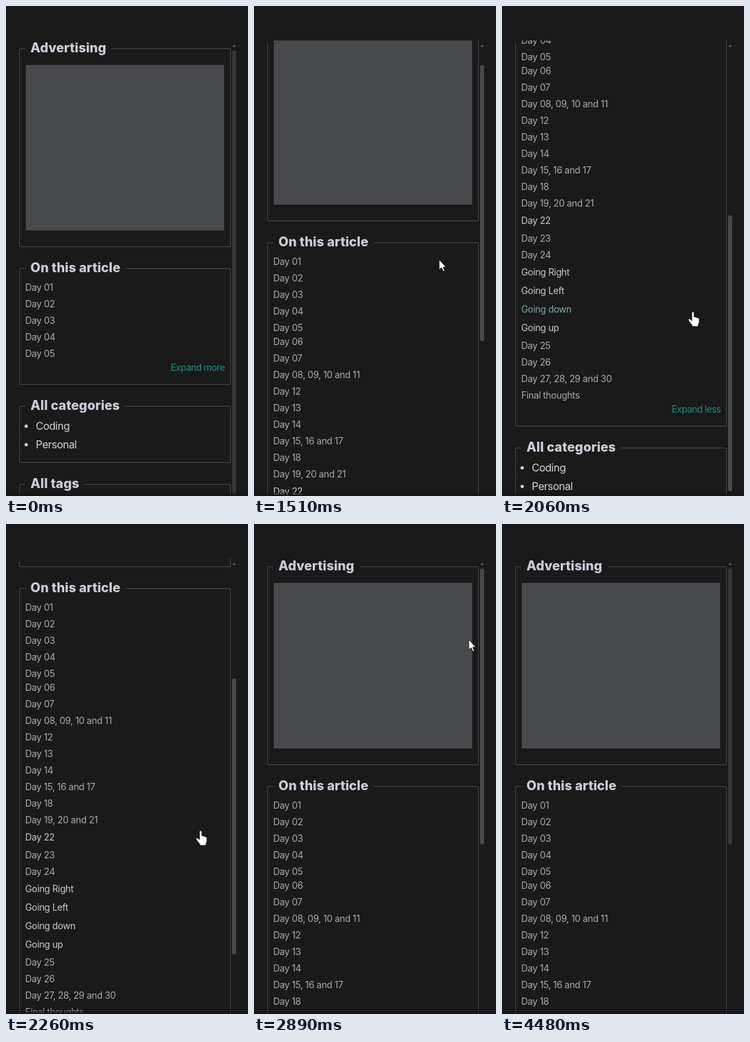
These frames come from a looping animation (366 px wide and 740 px high, 4.55 s). An HTML page:

```html
<!DOCTYPE html>
<html lang="en">
<head>
<meta charset="utf-8">
<title>Sidebar</title>
<style>
  html, body { margin: 0; width: 100%; height: 100%; overflow: hidden; background: #1a1a1a; }
  body { position: relative; font: 14px/25px Inter, sans-serif; letter-spacing: -.035em; color: #a9a9ac; }
  ul { list-style: none; margin: 0; padding: 0; }
  .view { position: absolute; left: 20px; top: 52px; width: 321px; bottom: 0; overflow: hidden;
          border-top-left-radius: 6px; }
  .page { position: absolute; left: -20px; top: -52px; width: 341px; will-change: transform; }
  .box { position: absolute; left: 20px; width: 318px; border: 1px solid #48484b; border-radius: 2px; }
  h2 { position: absolute; left: 8px; top: -14px; margin: 0; padding: 0 8px; background: #1a1a1a;
       font: 800 19.5px/24px Inter, sans-serif; letter-spacing: .005em; color: #cfccd9; white-space: nowrap; }
  .ad { position: absolute; left: 9px; top: 24px; width: 300px; height: 250px; background: #48494c; }
  .list { position: absolute; left: 29px; width: 302px; white-space: nowrap; overflow: hidden;
          letter-spacing: -.025em; }
  .list li { height: 25px; }
  .list .sub { height: 28px; line-height: 28px; color: #c9c9cd; }
  .toggle { position: absolute; right: 10px; height: 21px; line-height: 23px; color: #168f86;
            border: 1px solid transparent; margin-right: -1px; white-space: nowrap; }
  .toggle.over { color: #0d665e; text-decoration: underline; }
  .toggle.focus { border-color: #17423e; }
  .tail { position: absolute; left: 0; top: 0; width: 341px; }
  .cats { position: absolute; left: 24px; top: 15px; font-size: 16px; line-height: 28px; color: #d3d2d8; }
  .cats li::before { content: ""; position: absolute; left: -17px; width: 5px; height: 5px;
                     margin-top: 12px; border-radius: 50%; background: #d3d2d8; }
  .thumb { position: absolute; left: 342px; width: 6px; border-radius: 3px; }
  .up { position: absolute; left: 342px; top: 58px; border: 3px solid transparent; border-top: 0;
        border-bottom: 4px solid #505053; }
  .shade { position: absolute; left: 0; right: 0; bottom: 0; height: 7px;
           background: linear-gradient(transparent, #141414); }
  svg { position: absolute; left: 0; top: 0; overflow: visible; }
</style>
</head>
<body>
<div class="view"><div class="page" id="page">
  <div class="box" style="top:64px;height:298px"><h2>Advertising</h2><div class="ad"></div></div>
  <div class="box" id="article" style="top:396px"><h2>On this article</h2></div>
  <ul class="list" id="first" style="top:412px"></ul>
  <ul class="list" id="more" style="top:533px"></ul>
  <div class="toggle" id="toggle"></div>
  <div class="tail" id="tail">
    <div class="box" style="top:604px;height:84px"><h2>All categories</h2>
      <ul class="cats"><li>Coding</li><li>Personal</li></ul></div>
    <div class="box" style="top:722px;height:118px"><h2>All tags</h2></div>
  </div>
</div></div>
<div class="up"></div>
<div class="thumb" id="thumb"></div>
<div class="shade"></div>
<svg width="1" height="1" id="pointer" fill="#fff" stroke="#111" stroke-width=".9" stroke-linejoin="round">
  <path id="arrow" d="M0 0V15.5L3.6 12.2L6 18L8.4 17L6 11.4H10.6Z"/>
  <path id="hand" d="M-2 1.5a1.8 1.8 0 0 1 3.6 0V7.2l2.2.3.4.6 2.1.3.4.6 1.4.3c1 .2 1.3.8 1.2 1.8V15c0 2-1.3 3.3-1.5 5.2V22H-1.5V20.2c-1.5-2-3.5-4-5.4-7.6c-1-1.8.8-3 2.3-1.6L-2 13.2Z"/>
</svg>
<script>
const LOOP = 4550, MAX_SCROLL = 448, GROWTH = 511;
const CLICK = 850, FADE = 120;
const $ = id => document.getElementById(id);
const clamp = x => Math.min(1, Math.max(0, x));
const ramp = (t, a, b) => clamp((t - a) / (b - a));
const ease = x => (1 - Math.cos(Math.PI * x)) / 2;
const mix = (a, b, k) => `rgb(${a.map((v, i) => Math.round(v + (b[i] - v) * k))})`;

const GREY = [169, 169, 172], LIGHT = [201, 201, 205], TEAL = [22, 143, 134];
const names = ['01', '02', '03', '04', '05', '06', '07', '08, 09, 10 and 11', '12', '13', '14',
  '15, 16 and 17', '18', '19, 20 and 21', '22', '23', '24', '>Right', '>Left', '>down', '>up',
  '25', '26', '27, 28, 29 and 30'].map(s => s[0] === '>' ? 'Going ' + s.slice(1) : 'Day ' + s);
names.push('Final thoughts');

let rowTop = 412;
const rows = names.map((name, i) => {
  if (i === 5) rowTop = 533;
  const sub = name === 'Day 22' || name.startsWith('Going');
  const el = document.createElement('li');
  el.textContent = name;
  if (sub) el.className = 'sub';
  $(i < 5 ? 'first' : 'more').append(el);
  const row = { el, top: rowTop, end: rowTop + (sub ? 28 : 25), base: sub ? LIGHT : GREY, extra: i >= 5 };
  rowTop = row.end;
  return row;
});

// time, x, y of the pointer's hot spot
const path = [
  [140, 326, 330], [550, 312, 452], [760, 302, 551], [980, 302, 551], [1460, 280, 383],
  [1540, 280, 383], [1880, 289, 462], [2120, 289, 462], [2470, 305, 466], [2750, 317, 198],
  [3000, 330, 159], [3300, 344, 199], [3440, 338, 213], [3760, 300, 598]
];

function pointerAt(t) {
  const n = path.findIndex(p => p[0] > t);
  if (n < 1) return null;
  const [a, b] = [path[n - 1], path[n]];
  const k = ease(ramp(t, a[0], b[0]));
  return { x: a[1] + (b[1] - a[1]) * k, y: a[2] + (b[2] - a[2]) * k };
}

const scrollAt = t => MAX_SCROLL * (ease(ramp(t, 1396, 2000)) - ease(ramp(t, 2120, 2480)));
const growthAt = t => GROWTH * ease(ramp(t, 900, 1130));

function hoveredRow(t) {
  const p = pointerAt(t), s = scrollAt(t);
  if (!p || p.x > 331 || Math.abs(s - scrollAt(t - 16)) > .5) return null;
  const y = p.y + s, open = growthAt(t);
  return rows.find(r => y >= r.top && y < r.end && (!r.extra || r.end - 533 <= open + 4));
}

function draw(t) {
  const scroll = scrollAt(t), grow = growthAt(t), p = pointerAt(t);
  $('page').style.transform = `translateY(${-Math.round(scroll)}px)`;
  $('article').style.height = 174 + grow + 'px';
  $('more').style.height = grow + 'px';
  $('tail').style.transform = `translateY(${grow}px)`;

  const toggle = $('toggle'), y = 533 + grow;
  const over = p && p.x > 249 && p.x < 331 && p.y + scroll >= y && p.y + scroll < y + 23;
  toggle.style.top = y + 'px';
  toggle.textContent = t < CLICK ? 'Expand more' : 'Expand less';
  toggle.classList.toggle('over', !!over);
  toggle.classList.toggle('focus', !!over && t >= CLICK - 60);

  const steps = 6, recent = [];
  for (let i = 0; i < steps; i++) recent.push(hoveredRow(t - i * FADE / steps));
  for (const r of rows)
    r.el.style.color = mix(r.base, TEAL, recent.filter(h => h === r).length / steps);

  const content = 811 + grow, thumb = $('thumb').style;
  thumb.top = 67 + scroll * 735 / content + 'px';
  thumb.height = 735 * 750 / content + 'px';
  thumb.background = mix([54, 54, 56], [68, 73, 77], ramp(t, 140, 340) - ramp(t, 3900, 4130));

  $('pointer').style.display = p ? '' : 'none';
  if (p) {
    const link = p.y >= 412 && p.x < 331;
    $('pointer').style.transform = `translate(${p.x}px,${p.y}px)`;
    $('hand').style.display = link ? '' : 'none';
    $('arrow').style.display = link ? 'none' : '';
  }
}

const start = performance.now();
function tick() {
  draw((performance.now() - start) % LOOP);
  requestAnimationFrame(tick);
}
tick();
</script>
</body>
</html>
```
